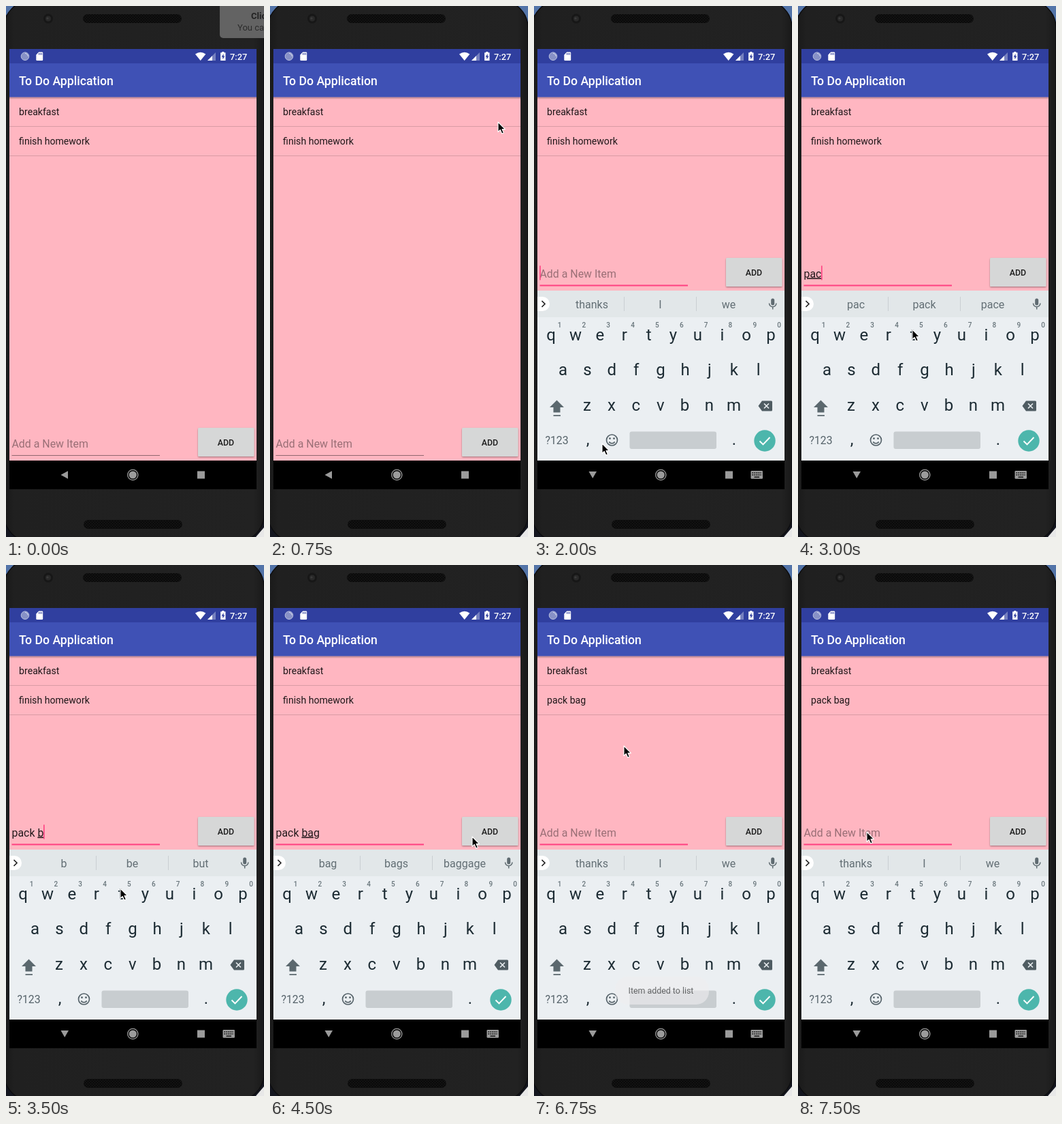
Recreate the animation shown at these times as an HTML page. Size 379 px wide and 778 px high, loop 8000 ms.

```html
<!DOCTYPE html>
<html lang="en">
<head>
<meta charset="utf-8">
<title>To do list</title>
<style>
html, body { margin: 0; width: 100%; height: 100%; overflow: hidden; background: #14161f; }
svg { display: block; width: 379px; height: 778px; }
text { font-family: Roboto, "Open Sans", sans-serif; white-space: pre; }
.mid { text-anchor: middle; }
.item { font-size: 14.1px; fill: #1f1719; }
.field { font-size: 15.9px; }
.key { font-size: 24px; fill: #1c2b33; }
.num { font-size: 10px; font-weight: 500; fill: #68757b; }
.sugg { font-size: 16px; fill: #626e74; }
.u { text-decoration: underline; }
</style>
</head>
<body>
<svg viewBox="0 0 379 778">
  <defs>
    <linearGradient id="body" x2="1" y2="0">
      <stop offset="0" stop-color="#191919"/><stop offset=".04" stop-color="#202020"/>
      <stop offset=".96" stop-color="#222"/><stop offset="1" stop-color="#191919"/>
    </linearGradient>
    <linearGradient id="fall" x2="0" y2="1">
      <stop offset="0" stop-color="#000" stop-opacity=".3"/><stop offset="1" stop-color="#000" stop-opacity="0"/>
    </linearGradient>
    <pattern id="mesh" width="4" height="4" patternUnits="userSpaceOnUse">
      <path fill="#0c0c0c" d="M0 0h4v4H0z"/><path fill="#1c1c1c" d="M0 0h1v1H0zM2 2h1v1H2z"/>
    </pattern>
    <filter id="soft" x="-10%" y="-20%" width="120%" height="150%">
      <feDropShadow dx="0" dy="1.2" stdDeviation="1" flood-opacity=".35"/>
    </filter>
  </defs>

  <!-- phone -->
  <path fill="#14161f" d="M0 0h379v778H0z"/>
  <path fill="#5374a8" d="M355 0h24v26zM0 0h12L0 14z"/>
  <path fill="#e8e8e8" d="M379 764v14h-12z"/>
  <rect x="-3" y="-8" width="382" height="793" rx="40" fill="url(#body)" stroke="#0d0d0f" stroke-width="1.5"/>
  <circle cx="62" cy="18.5" r="7" fill="#171717"/>
  <circle cx="62" cy="18.5" r="4" fill="#292929"/>
  <circle cx="61" cy="18" r="1.6" fill="#3b3b3b"/>
  <rect x="113" y="12" width="145" height="13" rx="6.5" fill="url(#mesh)"/>
  <rect x="114" y="753" width="145" height="13" rx="6.5" fill="url(#mesh)"/>

  <!-- app -->
  <path fill="#ffb6c1" d="M5 133h363v533H5z"/>
  <path fill="url(#fall)" d="M5 133.5h363v3.5H5z"/>
  <path fill="#303f9f" d="M5 63h363v21.5H5z"/>
  <path fill="#3f51b5" d="M5 84h363v49.5H5z"/>
  <circle cx="28" cy="73.7" r="5.8" fill="#8791c6" stroke="#b9c0e0"/>
  <path d="M28 69.5a4.2 4.2 0 0 1 4.2 4.2" fill="none" stroke="#dfe3f3"/>
  <path fill="#fff" d="M48.2 67.5H53q1.2 0 1.2 1.2v10q0 1.2-1.2 1.2h-7.5q-1.200 0-1.2-1.2v-7.200z"/>
  <path stroke="#303f9f" d="M48.5 69v2.500M50.500 69v2.500M52.500 69v2.500"/>
  <path fill="#fff" d="M278 70.500q7.700-5.500 15.400 0L285.700 80z"/>
  <path fill="#7681bf" d="M308 68v12h-12z"/>
  <path fill="#fff" d="M303 73v7h-7z"/>
  <path fill="#fff" d="M317.300 67h3v1.300h2.200v11.700h-7.400V68.300h2.200z"/>
  <path fill="#303f9f" d="M319.600 70l-3 4.700h1.800v3.600l3-4.900h-1.800z"/>
  <text x="329" y="78.500" font-size="12.8" font-weight="500" fill="#fff">7:27</text>
  <text x="19.100" y="116" font-size="17.66" font-weight="500" fill="#fff">To Do Application</text>
  <g id="list"></g>

  <g id="entry">
    <text id="hint" class="field" x="8.500" y="646.500" fill="#996f76">Add a New Item</text>
    <text id="typed" class="field" x="8.500" y="646.500" fill="#221a1c"><tspan id="done"></tspan><tspan id="word" class="u"></tspan></text>
    <path id="line" d="M8.500 658.500h217.500"/>
    <path id="caret" stroke="#ff4081" stroke-width="1.600" d="M0 629.500v21"/>
    <rect id="add" x="282" y="618" width="82.500" height="42" rx="1.500" filter="url(#soft)"/>
    <text class="mid" x="323" y="644" font-size="12.4" font-weight="500" fill="#1d1d1d">ADD</text>
  </g>

  <g id="board">
    <path fill="#ebeff2" d="M5 417h363v249H5z"/>
    <path fill="#e2e7e9" d="M5 417h363v39H5z"/>
    <path fill="#fff" d="M5 426h7.500a10.500 10.500 0 0 1 0 21H5z"/>
    <path fill="none" stroke="#222" stroke-width="1.700" d="M11.500 432l4.500 4.500-4.500 4.500"/>
    <path stroke="#c9cfd2" d="M132.500 426v21M238.500 426v21"/>
    <g id="suggs"></g>
    <rect x="348.200" y="428.500" width="5" height="10" rx="2.500" fill="#5f6b71"/>
    <path fill="none" stroke="#5f6b71" stroke-width="1.500" d="M345.500 435.500a5.200 5.200 0 0 0 10.400 0M350.700 441v3.500"/>
    <g id="keys"></g>
    <path fill="#5b686e" d="M33.500 577.500l10.500 10.500h-5.500v7.500h-10V588H23zM28.500 599.300h10.500v1.700H28.500z"/>
    <path fill="#4f5c62" d="M335 578.500h13.500q1.500 0 1.500 1.500v12q0 1.500-1.500 1.500H335l-5.500-7.500z"/>
    <path stroke="#ebeff2" stroke-width="1.600" d="M338 582.500l7 7M345 582.500l-7 7"/>
    <text x="16.500" y="642" font-size="15.8" fill="#56636a">?123</text>
    <text class="key mid" x="79" y="643">,</text>
    <text class="key mid" x="294" y="643">.</text>
    <g fill="none" stroke="#56636a" stroke-width="1.700">
      <circle cx="114.500" cy="636" r="8"/>
      <path d="M110.300 638.500a4.700 4.200 0 0 0 8.400 0"/>
    </g>
    <g fill="#56636a"><circle cx="111.500" cy="633.700" r="1.400"/><circle cx="117.500" cy="633.700" r="1.400"/></g>
    <rect x="140.500" y="623.500" width="127.500" height="25.500" rx="3" fill="#c8cdd0"/>
    <circle cx="339" cy="637" r="15.700" fill="#4db6ac"/>
    <path fill="none" stroke="#fff" stroke-width="1.900" d="M331.500 637.500l5 5 10-10.500"/>
  </g>

  <g id="toast">
    <rect x="119" y="603" width="138" height="41" rx="19" fill="#efeef0"/>
    <text class="mid" x="186.500" y="627.500" font-size="12.400" fill="#161616">Item added to list</text>
  </g>

  <!-- navigation bar -->
  <path d="M5 666h363v42H5z"/>
  <g fill="#9b9b9b">
    <path id="back"/>
    <circle cx="186.300" cy="687" r="5.600"/>
    <circle cx="186.300" cy="687" r="7.600" fill="none" stroke="#9b9b9b" stroke-width="1.300"/>
    <path d="M281 681.500h11V692.500h-11z"/>
    <g id="switch">
      <rect x="318.500" y="681" width="17.500" height="11.800" rx="1.300"/>
      <path fill="none" stroke="#000" stroke-width="1.500" stroke-dasharray="1.500 1.200" d="M320.500 684h14M320.500 687h14"/>
      <path stroke="#000" stroke-width="1.300" d="M323.500 690.200h7.500"/>
    </g>
  </g>

  <g id="note">
    <rect x="314" y="-8" width="90" height="55" rx="5" fill="#636363"/>
    <text x="360" y="19" font-size="13" font-weight="700" fill="#222">Click</text>
    <text x="340" y="36" font-size="13" fill="#2b2b2b">You can</text>
  </g>
  <path id="arrow" stroke="#fff" stroke-width="1.100" stroke-linejoin="round"
    d="M0 0V14.500L3.300 11.500 5.700 17 8.300 15.900 6 10.600H10.400Z"/>
</svg>
<script>
const $ = id => document.getElementById(id);
const STEP = 250, LOOP = 8000;
const label = (cls, x, y, s) => `<text class="${cls}" x="${x}" y="${y}">${s}</text>`;

// keyboard letters
const rows = [["qwertyuiop", 25, 489.5], ["asdfghjkl", 42.5, 541], ["zxcvbnm", 78, 593]];
let keys = "";
for (const [letters, x, y] of rows)
  [...letters].forEach((c, i) => keys += label("key mid", x + i * 35.9, y, c));
for (let i = 0; i < 10; i++) keys += label("num mid", 37.5 + i * 35.85, 471, (i + 1) % 10);
$("keys").innerHTML = keys;

// pointer stops: [ms, x, y]
const stops = [
  [500, 365, 25], [750, 335, 170], [1000, 215, 460], [1250, 118, 638], [1500, 100, 641],
  [2000, 100, 641], [2250, 130, 562], [2500, 168, 474], [4000, 168, 474], [4250, 245, 428],
  [4500, 297, 398], [4750, 297, 398], [5000, 280, 360], [5250, 222, 288], [5500, 174, 233],
  [5750, 146, 206], [6000, 140, 203], [6500, 140, 203], [6750, 132, 265], [7000, 113, 350],
  [7250, 101, 391], [8000, 101, 391]
];
// typing: [ms, finished part, current word, suggestions]
const typing = [
  [0, "", "", "thanks I we"],
  [2750, "", "p", "p per put"],
  [3000, "", "pac", "pac pack pace"],
  [3250, "", "pack", "pack packs packed"],
  [3500, "pack ", "b", "b be but"],
  [3750, "pack ", "ba", "ba back bad"],
  [4000, "pack ", "bag", "bag bags baggage"],
  [5000, "", "", "thanks I we"]
];

const show = (id, on) => $(id).style.display = on ? "" : "none";
const set = (id, attrs) => { for (const k in attrs) $(id).setAttribute(k, attrs[k]); };

function pointer(t) {
  const i = stops.findIndex(s => s[0] > t) - 1;
  const a = stops[i], b = stops[i + 1], k = (t - a[0]) / (b[0] - a[0]);
  return [1, 2].map(n => a[n] + (b[n] - a[n]) * k);
}

function draw(t) {
  show("note", t < 500);
  set("note", { transform: `translate(${t ? 38 : 0} 0)` });
  show("arrow", t >= 500);
  if (t >= 500) set("arrow", { transform: `translate(${pointer(t)})` });

  const items = ["breakfast"];
  if (t < 6500) items.push("finish homework");
  if (t >= 5000) items.push("pack bag");
  $("list").innerHTML = items.map((s, i) => {
    const y = i * 43.3;
    return label("item", 19.1, 160 + y, s) +
      `<path d="M5 ${Math.round(176 + y) + .5}h363" stroke="#d99ba5"/>`;
  }).join("");

  const focus = t >= 1750, open = t >= 2000;
  const [, done, word, suggs] = typing.filter(r => r[0] <= t).pop();
  set("entry", { transform: `translate(0 ${open ? -249 : 0})` });
  set("line", { stroke: focus ? "#ff4081" : "#8f676e", "stroke-width": focus ? 1.8 : 1 });
  set("add", { fill: t === 4750 ? "#c3c4c4" : "#d6d7d7" });
  show("hint", !word);
  $("done").textContent = done;
  $("word").textContent = word;
  const width = word ? $("typed").getComputedTextLength() : 0;
  const blink = t < 4250 ? t < 2500 || t >= 2750 : t % 1000 < 500 && t > 5500;
  show("caret", focus && blink && t !== 4500);
  set("caret", { transform: `translate(${9 + width} 0)` });

  show("board", open);
  show("switch", open);
  set("back", { d: open ? "M80.5 682h11.500L86.200 692z" : "M80.500 687L91 681.200v11.600z" });
  $("suggs").innerHTML = suggs.split(" ")
    .map((s, i) => label("sugg mid", 85 + i * 100.5, 442.5, s)).join("");
  show("toast", t >= 5000 && t < 7000);
  set("toast", { opacity: t === 5000 || t === 6750 ? .6 : 1 });
}

let last = -1;
const start = performance.now();
function tick() {
  const t = Math.floor((performance.now() - start) % LOOP / STEP) * STEP;
  if (t !== last) draw(last = t);
  requestAnimationFrame(tick);
}
tick();
</script>
</body>
</html>
```
